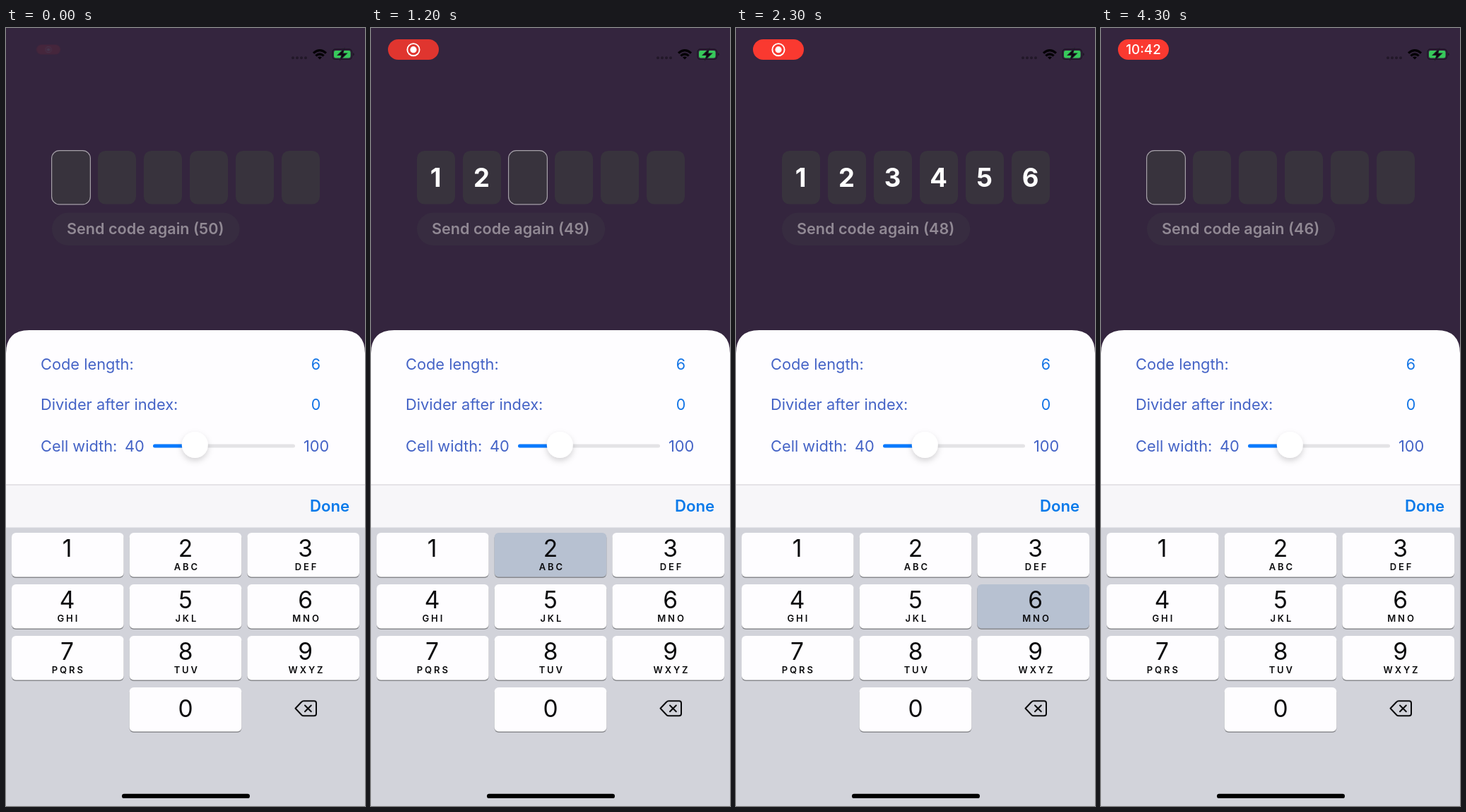
These frames come from a looping animation (508 by 1102 pixels, 4400 ms). An HTML page:

```html
<!DOCTYPE html>
<html lang="en">
<head>
<meta charset="utf-8">
<title>Code entry</title>
<style>
  html, body { margin: 0; width: 100%; height: 100%; overflow: hidden; background: #34253e; }
  svg { display: block; width: 100vw; height: 100vh; font-family: Inter, "Liberation Sans", sans-serif; }
  .mid { text-anchor: middle; }
  .label { font-size: 21.8px; fill: #4463c6; }
  .value { font-size: 21.5px; fill: #1475e6; text-anchor: middle; }
  .cell { fill: #38333d; }
  .digit { font-size: 36.5px; font-weight: 700; fill: #fff; text-anchor: middle; }
  .resend { font-size: 21.6px; font-weight: 600; fill: #918994; }
  .done { font-size: 22.2px; font-weight: 600; fill: #0a7aea; }
  .key { fill: #fefdff; }
  .key.down { fill: #b7c1d1; }
  .num { font-size: 33.5px; fill: #0b0b0d; text-anchor: middle; }
  .abc { font-size: 13px; font-weight: 600; letter-spacing: 2.9px; fill: #0b0b0d; text-anchor: middle; }
  .clock { font-size: 18.8px; font-weight: 500; fill: #fff; text-anchor: middle; }
  .erase { fill: none; stroke: #0b0b0d; stroke-width: 2; stroke-linejoin: round; stroke-linecap: round; }
  .erase.down .body { fill: #0b0b0d; }
  .erase.down .cross { stroke: #d2d3da; }

  .pill, .pill rect, .ring, .clock { animation: 4.4s linear infinite; }
  .pill { transform-origin: 60px 30.5px; animation-name: grow; animation-timing-function: ease-out; }
  .pill rect { animation-name: pulse; }
  .ring { animation-name: ring; }
  .clock { animation-name: clock; }
  @keyframes grow {
    0% { transform: scale(.47); opacity: .08; }
    5.5% { transform: scale(1.04); opacity: 1; }
    8.5%, 100% { transform: none; opacity: 1; }
  }
  @keyframes pulse {
    0%, 18%, 34.5%, 59%, 80%, 100% { fill: #fa3930; }
    27.3%, 70.5% { fill: #e0352f; }
  }
  @keyframes ring { 0%, 70.5% { opacity: 1; } 77%, 100% { opacity: 0; } }
  @keyframes clock { 0%, 67% { opacity: 0; } 77%, 100% { opacity: 1; } }
</style>
</head>
<body>
<svg viewBox="0 0 508 1102" preserveAspectRatio="none">
  <defs>
    <filter id="soft" x="-50%" y="-50%" width="200%" height="200%">
      <feDropShadow dx="0" dy="4" stdDeviation="4" flood-color="#000" flood-opacity=".17"/>
    </filter>
  </defs>
  <rect width="508" height="1102" fill="#34253e"/>

  <g class="pill">
    <rect x="24" y="16" width="72" height="29" rx="14.5" fill="#fa3930"/>
    <text class="clock" id="clock" x="60" y="37">10:41</text>
    <g class="ring">
      <circle cx="60" cy="30.7" r="8.6" fill="none" stroke="#fff" stroke-width="1.9"/>
      <circle cx="60" cy="30.7" r="4.6" fill="#fff"/>
    </g>
  </g>

  <g fill="#221829">
    <circle cx="406" cy="42.3" r="2"/><circle cx="412" cy="42.3" r="2"/>
    <circle cx="418" cy="42.3" r="2"/><circle cx="424" cy="42.3" r="2"/>
  </g>
  <g fill="none" stroke="#050306" stroke-width="3.2">
    <path d="M435 35.6Q444 27.6 453 35.6"/>
    <path d="M438.3 39.4Q444 34.6 449.7 39.4"/>
    <path d="M444 44.6L441 41.6Q444 39.2 447 41.6Z" fill="#050306" stroke="none"/>
  </g>
  <rect x="462" y="30" width="27.5" height="14.4" rx="4.2" fill="none" stroke="#1f1626" stroke-width="1.3"/>
  <path d="M491 35v4.6q1.8-.8 1.8-2.3t-1.8-2.3" fill="#1f1626"/>
  <rect x="464" y="32" width="23.5" height="10.4" rx="2.4" fill="#37c95b"/>
  <path d="M478.5 29.5L469.5 38.3H475L473 45L482.2 36H476.6Z" fill="#0a070c" stroke="#21182a" stroke-width="1.2"/>

  <g id="cells"></g>
  <rect id="focus" y="173.6" width="54.8" height="76.2" rx="11" fill="none" stroke="#a6a1a9" stroke-width="1.2"/>
  <rect id="button" x="65" y="261.5" width="267" height="46.5" rx="23.2" fill="#372c40"/>
  <text class="resend" id="resend" x="86" y="292.3">Send code again (50)</text>

  <path d="M0 660V461Q0 428 33 428H475Q508 428 508 461V660Z" fill="#fefdff"/>
  <g class="label">
    <text x="49" y="484">Code length:</text>
    <text x="49" y="541">Divider after index:</text>
    <text x="49" y="599.5">Cell width:</text>
    <text x="168" y="599.5">40</text>
    <text x="421" y="599.5">100</text>
  </g>
  <text class="value" x="438.5" y="483.5">6</text>
  <text class="value" x="438.5" y="541">0</text>
  <rect x="208" y="589.5" width="201" height="5" rx="2.5" fill="#e4e3e6"/>
  <rect x="208" y="589.5" width="60" height="5" rx="2.5" fill="#0a7aff"/>
  <circle cx="267.3" cy="590.5" r="18.5" fill="#fff" filter="url(#soft)"/>

  <rect y="647" width="508" height="61" fill="#f7f6f9"/>
  <rect y="646.5" width="508" height="1" fill="#cfced3"/>
  <text class="done" x="430" y="685.3">Done</text>
  <rect y="707.5" width="508" height="394.5" fill="#d2d3da"/>
  <g id="keys"></g>
  <g class="erase" id="erase">
    <path class="body" d="M409.5 963.8L418 954.8Q419.3 953.3 421.3 953.3H436Q439 953.3 439 956.3V971.3Q439 974.3 436 974.3H421.3Q419.3 974.3 418 972.8Z"/>
    <path class="cross" d="M423 959.5l8.8 8.8m0-8.8l-8.8 8.8"/>
  </g>
  <rect x="164" y="1084.7" width="181" height="6.4" rx="3.2" fill="#000"/>
</svg>
<script>
const LOOP = 4400;
const $ = id => document.getElementById(id);

function add(parent, tag, attrs, text = '') {
  const el = document.createElementNS('http://www.w3.org/2000/svg', tag);
  for (const name in attrs) el.setAttribute(name, attrs[name]);
  el.textContent = text;
  return parent.appendChild(el);
}

// Code cells
const digits = [];
for (let i = 0; i < 6; i++) {
  add($('cells'), 'rect', { class: 'cell', x: 65 + 65 * i, y: 174, width: 54, height: 75.5, rx: 10.5 });
  digits.push(add($('cells'), 'text', { class: 'digit', x: 91.5 + 65 * i, y: 225 }, i + 1));
}

// Number pad
const letters = ['', '', 'ABC', 'DEF', 'GHI', 'JKL', 'MNO', 'PQRS', 'TUV', 'WXYZ'];
const keys = {};
function addKey(n, col, row) {
  const x = 8 + 166.7 * col, y = 715 + 73 * row;
  const mid = [86.5, 254, 423.7][col];
  const box = { x, y, width: 158.6, height: 62.6, rx: 6 };
  add($('keys'), 'rect', { ...box, y: y + 1.3, fill: '#898a8e' });
  keys[n] = add($('keys'), 'rect', { ...box, class: 'key' });
  add($('keys'), 'text', { class: 'num', x: mid, y: n ? y + 34.3 : 976 }, n);
  add($('keys'), 'text', { class: 'abc', x: mid + 1.8, y: y + 53 }, letters[n]);
}
for (let n = 1; n <= 9; n++) addKey(n, (n - 1) % 3, Math.floor((n - 1) / 3));
addKey(0, 1, 3);

// Touch-down and release times for keys 1 to 6, then the evenly tapped erase key
const presses = [[750, 870], [1080, 1260], [1380, 1540], [1690, 1850], [1960, 2080], [2190, 2350]];
const erases = presses.map((_, i) => [2930 + 235 * i, 3040 + 235 * i]);
const within = (t, [from, to]) => t >= from && t < to;
const begun = (list, t) => list.filter(([from]) => t >= from).length;

function render(t) {
  const filled = begun(presses, t) - begun(erases, t);
  digits.forEach((el, i) => el.style.display = i < filled ? '' : 'none');
  $('focus').style.display = filled < 6 ? '' : 'none';
  $('focus').setAttribute('x', 64.6 + 65 * filled);

  presses.forEach((span, i) => keys[i + 1].classList.toggle('down', within(t, span)));
  $('erase').classList.toggle('down', erases.some(span => within(t, span)));

  const label = `Send code again (${50 - Math.floor((t + 550) / 1000)})`;
  if ($('resend').textContent !== label) $('resend').textContent = label;
  $('button').setAttribute('width', $('resend').getComputedTextLength() + 43);
  $('clock').textContent = t < 3700 ? '10:41' : '10:42';
}

let start;
function tick(now) {
  start ??= now;
  render((now - start) % LOOP);
  requestAnimationFrame(tick);
}
render(0);
requestAnimationFrame(tick);
</script>
</body>
</html>
```
